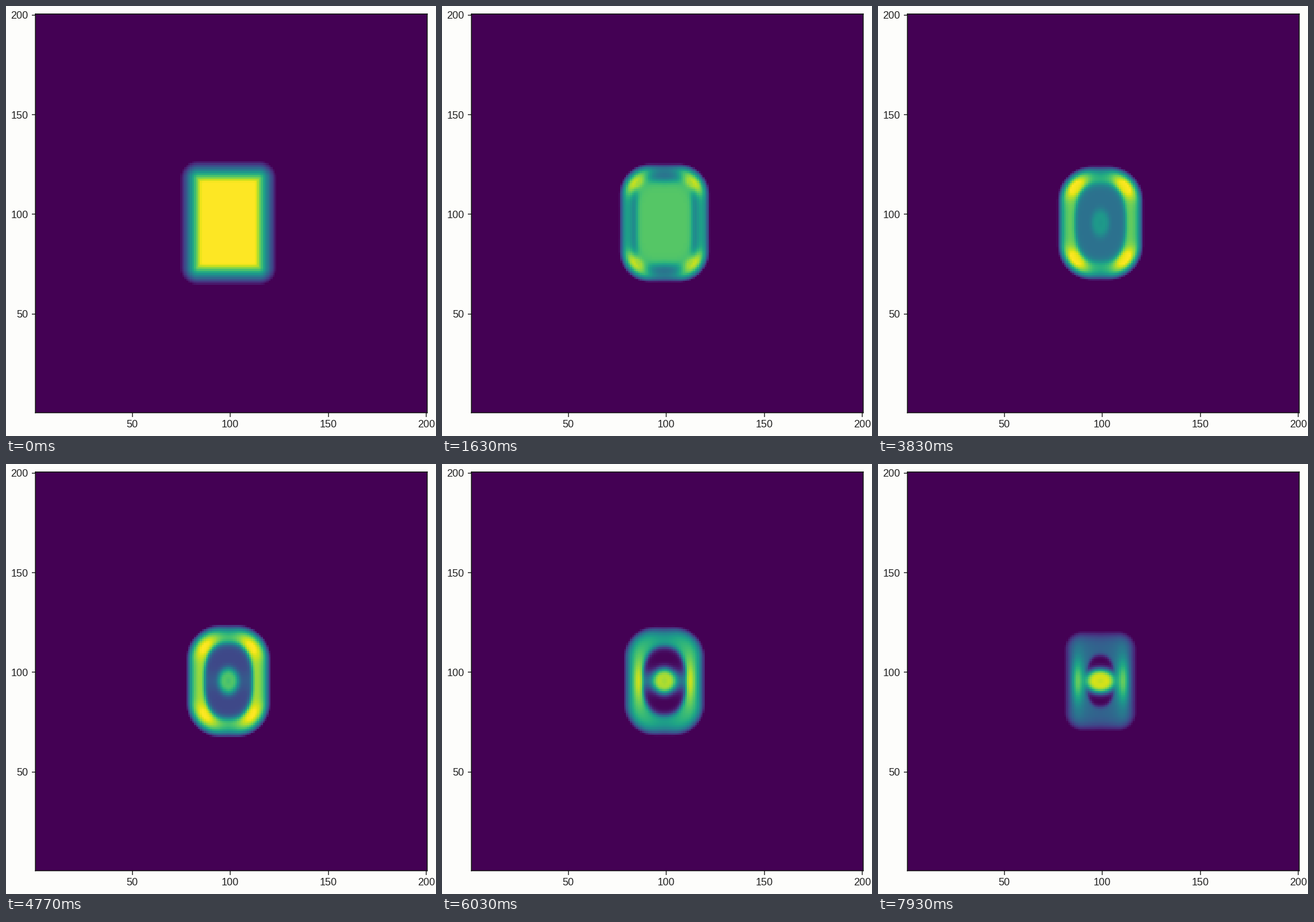
A matplotlib script that plays this animation: 748x748 px, repeating every 8000 ms.

```python
import numpy as np
import matplotlib.pyplot as plt
from matplotlib.animation import FuncAnimation

SIZE, DPI, N = 748, 100, 200
FRAMES, INTERVAL = 200, 40
LENGTH = 7.93
INK = "#222222"
PT = 72 / DPI

plt.rcParams["font.family"] = "Liberation Sans"

# Distances from the centre of the pattern, in cells
y, x = np.mgrid[1:N + 1, 1:N + 1].astype(float)
u, v = abs(x - 99), abs(y - 95.5)


def bell(d, s):
    return np.exp(-0.5 * (d / s) ** 2)


def mix(a, b, m):
    return a + (b - a) * m


def ramp(t, start, end):
    return np.clip((t - start) / (end - start), 0, 1)


def depth(hx, hy, r):
    """Distance inwards from the edge of a rounded box."""
    a, b = u - hx + r, v - hy + r
    outer = np.hypot(np.maximum(a, 0), np.maximum(b, 0))
    return r - outer - np.minimum(np.maximum(a, b), 0)


def oval(a, b, p=2):
    return ((u / a) ** p + (v / b) ** p) ** (1 / p)


def rim(t, s, e):
    """Soft slope at first, then a band that brightens and fades."""
    top = mix(.53, .92, ramp(t, .8, 4.8)) - .54 * ramp(t, 4.8, LENGTH)
    width = mix(2, 4, ramp(t, .8, 4.8))
    band = top * np.tanh(e / width) * (1 - .15 * bell(u, 6))
    return mix(e / 11, band, ramp(t, 0, .8))


def corners(t, e):
    """Spots stretched along the rim, drifting inwards."""
    a, b = u - 14.6 + .6 * t, v - 21.8 + .9 * t
    spot = bell(a - b, 7) * bell(a + b, 3.8)
    power = .45 * ramp(t, 0, .8) * (1 - ramp(t, 2.8, 6))
    return power * spot * np.clip(e / 4, 0, 1)


def bars(t):
    k = ramp(t, 4.8, LENGTH)
    return .42 * k ** .5 * bell(u - 14 + 2.5 * k, 2.2) * bell(v, 8)


def hollow(f, t, s):
    """The centre drains evenly while its outline turns from box to oval."""
    q = oval(13.6 - 6.4 * s ** 3, 20.5 - 7.5 * s ** 3, 2.4 + 12 * np.exp(-1.2 * t))
    f = f - .2 * bell(q - 1.15, .1) * bell(t - 2.2, .7)
    floor = max(1 - .165 * t, 0) + .36 * ramp(t, 4.5, 6) * bell(v, 3.5)
    return mix(f, floor, 1 / (1 + np.exp(np.clip((q - 1) / .05, -50, 50))))


def seed(f, t):
    k = ramp(t, 3.4, LENGTH)
    r = oval(mix(3.6, 6.4, k), mix(6, 5.2, k))
    power = 1 - np.exp(-max(t - 3.4, 0) / 1.2)
    return mix(f, 1, power * np.exp(-r ** 4 / 2) * (1 - .12 * bell(r, .35)))


def field(t):
    s = min(t / LENGTH, 1)
    half = 24.6 - 10.2 * s + 16.4 * s ** 2 - 12.4 * s ** 3
    e = depth(half, half + 6.7, 9 + 9 * np.sin(np.pi * s) ** .6)
    f = rim(t, s, e) + corners(t, e) + bars(t) * np.clip(e / 4, 0, 1)
    return np.clip(seed(hollow(np.minimum(f, 1), t, s), t), 0, 1)


fig = plt.figure(figsize=(SIZE / DPI, SIZE / DPI), dpi=DPI, facecolor="#fdfdfb")
left, right, top, bottom = 51.2, 732.7, 13.9, 707.5
ax = fig.add_axes([left / SIZE, 1 - bottom / SIZE,
                   (right - left) / SIZE, (bottom - top) / SIZE])
image = ax.imshow(field(0), cmap="viridis", vmin=0, vmax=1, origin="lower",
                  extent=(.5, N + .5, .5, N + .5), aspect="auto",
                  interpolation="nearest")
ticks = range(50, N + 1, 50)
ax.set_xticks(ticks)
ax.set_yticks(ticks)
ax.tick_params(length=6.5 * PT, width=1.5 * PT, pad=6 * PT, color=INK,
               labelcolor=INK, labelsize=18 * PT)
for spine in ax.spines.values():
    spine.set(color="#101010", linewidth=1.6 * PT, snap=False)


def draw(i):
    image.set_data(field(i * INTERVAL / 1000))
    return [image]


anim = FuncAnimation(fig, draw, frames=FRAMES, interval=INTERVAL,
                     repeat=True, repeat_delay=0)
plt.show()
```
